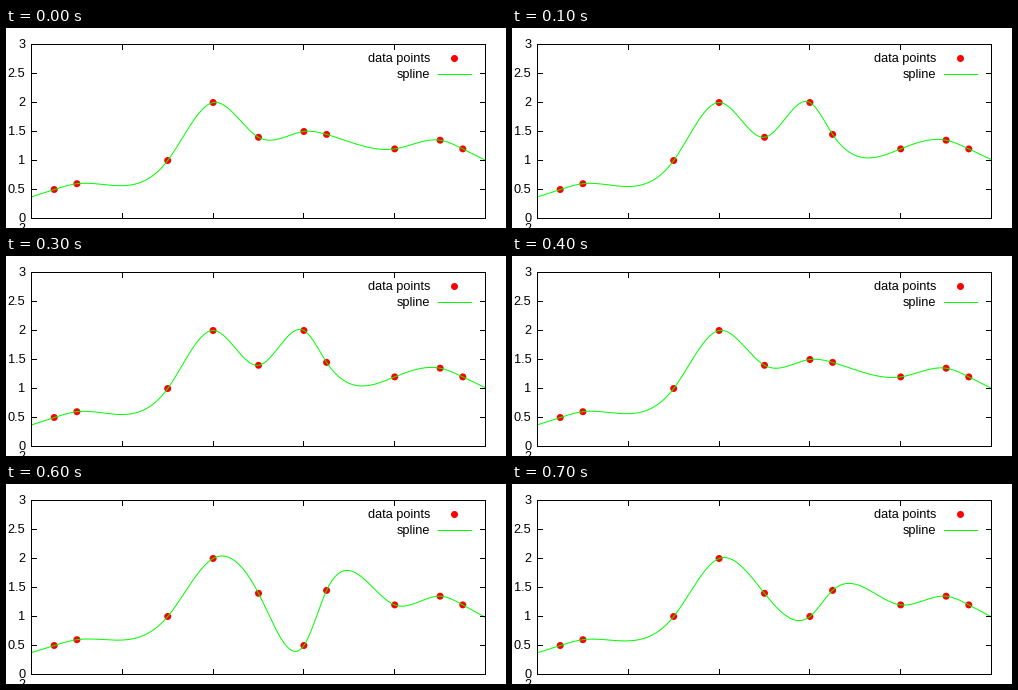
These frames come from a looping animation (500x200 px, 800 ms). A matplotlib script:

```python
import numpy as np
import matplotlib.pyplot as plt
from matplotlib.animation import FuncAnimation
from matplotlib.patches import Circle

WIDTH, HEIGHT, DPI = 500, 200, 100
LEFT, RIGHT, TOP, BOTTOM = 25.5, 479.5, 16.5, 190.5
PX = 72 / DPI
FRAMES = 8
MOVING = 5
KNOT_X = np.array([0.5, 1, 3, 4, 5, 6, 6.5, 8, 9, 9.5])
KNOT_Y = np.array([0.5, 0.6, 1, 2, 1.4, 1.5, 1.45, 1.2, 1.35, 1.2])
GREEN, RED = "#00ff00", "#ff0000"

plt.rcParams["font.family"] = "Liberation Sans"
plt.rcParams["font.size"] = 12.7 * PX


def to_px(x, y):
    return LEFT + np.asarray(x) * (RIGHT - LEFT) / 10, BOTTOM - np.asarray(y) * (BOTTOM - TOP) / 3


def natural_spline(xs, ys, x):
    """Natural cubic spline, continued as straight lines past both ends."""
    h = np.diff(xs)
    slope = np.diff(ys) / h
    n = len(xs)
    system, rhs = np.eye(n), np.zeros(n)
    for i in range(1, n - 1):
        system[i, i - 1:i + 2] = h[i - 1], 2 * (h[i - 1] + h[i]), h[i]
        rhs[i] = 6 * (slope[i] - slope[i - 1])
    m = np.linalg.solve(system, rhs)

    inside = np.clip(x, xs[0], xs[-1])
    k = np.clip(np.searchsorted(xs, inside) - 1, 0, n - 2)
    a, b, w = xs[k + 1] - inside, inside - xs[k], h[k]
    y = (m[k] * a**3 + m[k + 1] * b**3) / (6 * w)
    y += (ys[k] / w - m[k] * w / 6) * a + (ys[k + 1] / w - m[k + 1] * w / 6) * b
    first = slope[0] - h[0] * m[1] / 6
    last = slope[-1] + h[-1] * m[-2] / 6
    return y + first * np.minimum(x - xs[0], 0) + last * np.maximum(x - xs[-1], 0)


fig = plt.figure(figsize=(WIDTH / DPI, HEIGHT / DPI), dpi=DPI, facecolor="white")
ax = fig.add_axes([0, 0, 1, 1])
ax.set_xlim(0, WIDTH)
ax.set_ylim(HEIGHT, 0)
ax.axis("off")


def stroke(x, y, color="black", zorder=5):
    # Coordinates are pixel centres, so snapping would shift them
    return ax.plot(x, y, color=color, lw=PX, zorder=zorder, snap=False)[0]


def dot(x, y):
    return ax.add_patch(Circle((x, y), 3.5, fc=RED, lw=0, zorder=3))


def label(x, baseline, text):
    ax.text(x, baseline, text, ha="right", va="baseline")


# Border, inward ticks and axis labels
stroke([LEFT, RIGHT, RIGHT, LEFT, LEFT], [TOP, TOP, BOTTOM, BOTTOM, TOP])
for value in np.arange(0, 3.1, 0.5):
    y = float(to_px(0, value)[1])
    stroke([LEFT, LEFT + 5], [y, y])
    stroke([RIGHT - 5, RIGHT], [y, y])
    label(19.5, y + 3.5, f"{value:g}")
for value in (2, 4, 6, 8):
    x = np.floor(to_px(value, 0)[0]) + 0.5
    stroke([x, x], [TOP, TOP + 5])
    stroke([x, x], [BOTTOM - 5, BOTTOM])
label(19.5, 204, "2")

# Legend
label(424.5, 34, "data points")
label(424.5, 50, "spline")
dot(448.5, 30.5)
stroke([432.5, 465.5], [46.5, 46.5], GREEN)

dots = [dot(x, y) for x, y in zip(*to_px(KNOT_X, KNOT_Y))]
curve = stroke([], [], GREEN, zorder=4)
curve_x = np.linspace(0, 10, 455)


def update(frame):
    # Triangle wave: 1.5 up to 2.5, down to 0.5 and back
    ys = KNOT_Y.copy()
    ys[MOVING] = 2.5 - 0.5 * abs((frame + 2) % FRAMES - 4)
    dots[MOVING].center = to_px(KNOT_X[MOVING], ys[MOVING])
    curve.set_data(*to_px(curve_x, natural_spline(KNOT_X, ys, curve_x)))
    return dots[MOVING], curve


anim = FuncAnimation(fig, update, frames=FRAMES, interval=100, repeat=True)
plt.show()
```
